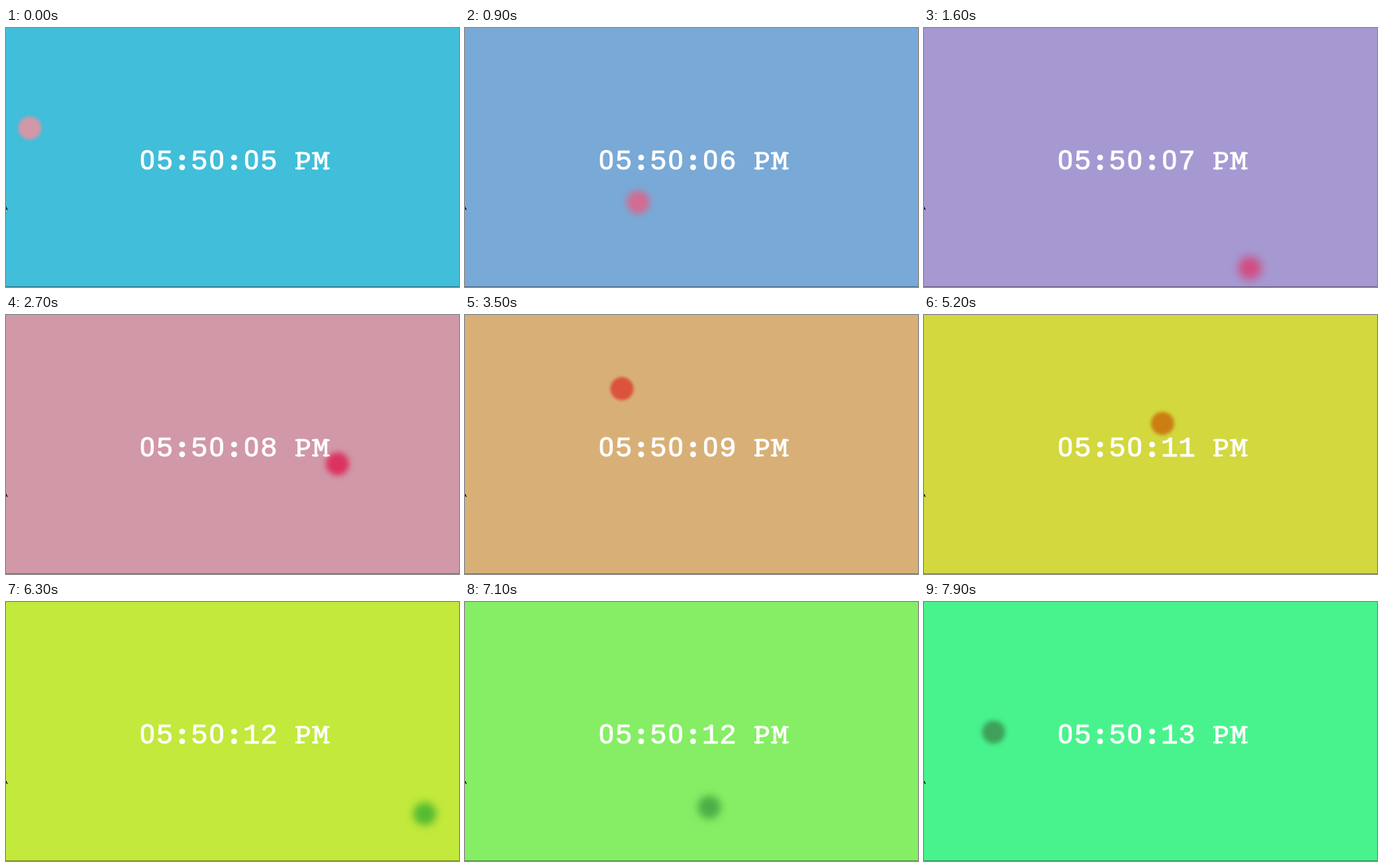
Write an HTML page that moves like this. It is 684 by 392 pixels and loops after 8000 ms.

```html
<!DOCTYPE html>
<html lang="en">
<head>
<meta charset="utf-8">
<title>Colour clock</title>
<style>
  html, body { margin: 0; width: 100%; height: 100%; overflow: hidden; }
  svg { display: block; width: 684px; height: 392px; }
  text { font: 43px "Liberation Mono", monospace; fill: #fff; stroke: #fff; stroke-width: .9px; text-anchor: middle; }
  .zero { font: 41.5px Roboto, sans-serif; }
  .colon { font: bold 38px "Open Sans", sans-serif; stroke-width: 2.4px; }
  .letter { font-size: 39px; }
</style>
</head>
<body>
<svg viewBox="0 0 684 392">
  <defs>
    <filter id="soft" x="-1" y="-1" width="3" height="3" color-interpolation-filters="sRGB">
      <feGaussianBlur id="blur" stdDeviation="0"/>
    </filter>
  </defs>
  <rect id="sky" width="684" height="392"/>
  <circle id="ball" r="17.5" filter="url(#soft)"/>
  <text id="clock" y="214"></text>
  <!-- slab serifs of P and M -->
  <path d="M437 212.5h14M437 189.5h5M462 212.5h9.5M479 212.5h9.5M462 189.5h5M484 189.5h4.5"
        stroke="#fff" stroke-width="3"/>
  <rect y="391" width="684" height="1" opacity=".4"/>
  <path d="M0 270L2.8 275.5L1.2 275L0 273.5Z"/>
</svg>
<script>
const LOOP = 8000, STEP = 100;
const byId = id => document.getElementById(id);
const sky = byId('sky'), ball = byId('ball'), blur = byId('blur'), clock = byId('clock');

// Colour stops: hex colour and time in seconds
const stops = list => list.split(', ').map(stop => {
  const [hex, time] = stop.split(' ');
  return { time: time * 1000, rgb: hex.match(/\w\w/g).map(pair => parseInt(pair, 16)) };
});
const skyStops = stops('#40beda 0, #a699d2 1.6, #d198a8 2.7, #dfcc40 4.4, #c2e93b 6.3, #48f38d 7.9');
const ballStops = stops('#d397a8 0, #d24b80 1.6, #db3261 2.7, #db7614 4.4, #cc7e14 5.2, #55bb32 6.3, #3ea05a 7.9');

function colourAt(t, list) {
  const next = list.findIndex(stop => stop.time > t);
  if (next < 0) return `rgb(${list.at(-1).rgb})`;
  const a = list[next - 1], b = list[next];
  const p = (t - a.time) / (b.time - a.time);
  return `rgb(${a.rgb.map((v, k) => Math.round(v + (b.rgb[k] - v) * p))})`;
}

// 1 at the peak time, 0 half a period later
function bounce(t, peak, period) {
  const phase = (((t - peak) / period) % 1 + 1) % 1;
  return Math.abs(1 - 2 * phase);
}

const cells = [...'05:50:05 PM'].map((_, i) => {
  const cell = document.createElementNS('http://www.w3.org/2000/svg', 'tspan');
  cell.setAttribute('x', 213.4 + i * 26.2);
  return clock.appendChild(cell);
});

const styleOf = char =>
  char === '0' ? 'zero' : char === ':' ? 'colon' : /[A-Z]/.test(char) ? 'letter' : '';

function showTime(t) {
  const seconds = String(5 + Math.floor((t + 850) / 1000)).padStart(2, '0');
  [...`05:50:${seconds} PM`].forEach((char, i) => {
    if (cells[i].textContent === char) return;
    cells[i].textContent = char;
    cells[i].setAttribute('class', styleOf(char));
  });
}

function draw(t) {
  const moved = t + 110 * Math.max(0, 1 - t / 800);
  const across = bounce(moved, 2163, 4000);
  const down = bounce(moved, 1665, 5000);
  sky.setAttribute('fill', colourAt(t, skyStops));
  ball.setAttribute('fill', colourAt(t, ballStops));
  ball.setAttribute('cx', 18.5 + 659 * across);
  ball.setAttribute('cy', 17 + 355.5 * down);
  blur.setAttribute('stdDeviation', 7 * down);
  showTime(t);
}

const start = performance.now();
function tick() {
  const t = (performance.now() - start) % LOOP;
  draw(Math.floor(t / STEP) * STEP);
  requestAnimationFrame(tick);
}
tick();
</script>
</body>
</html>
```
